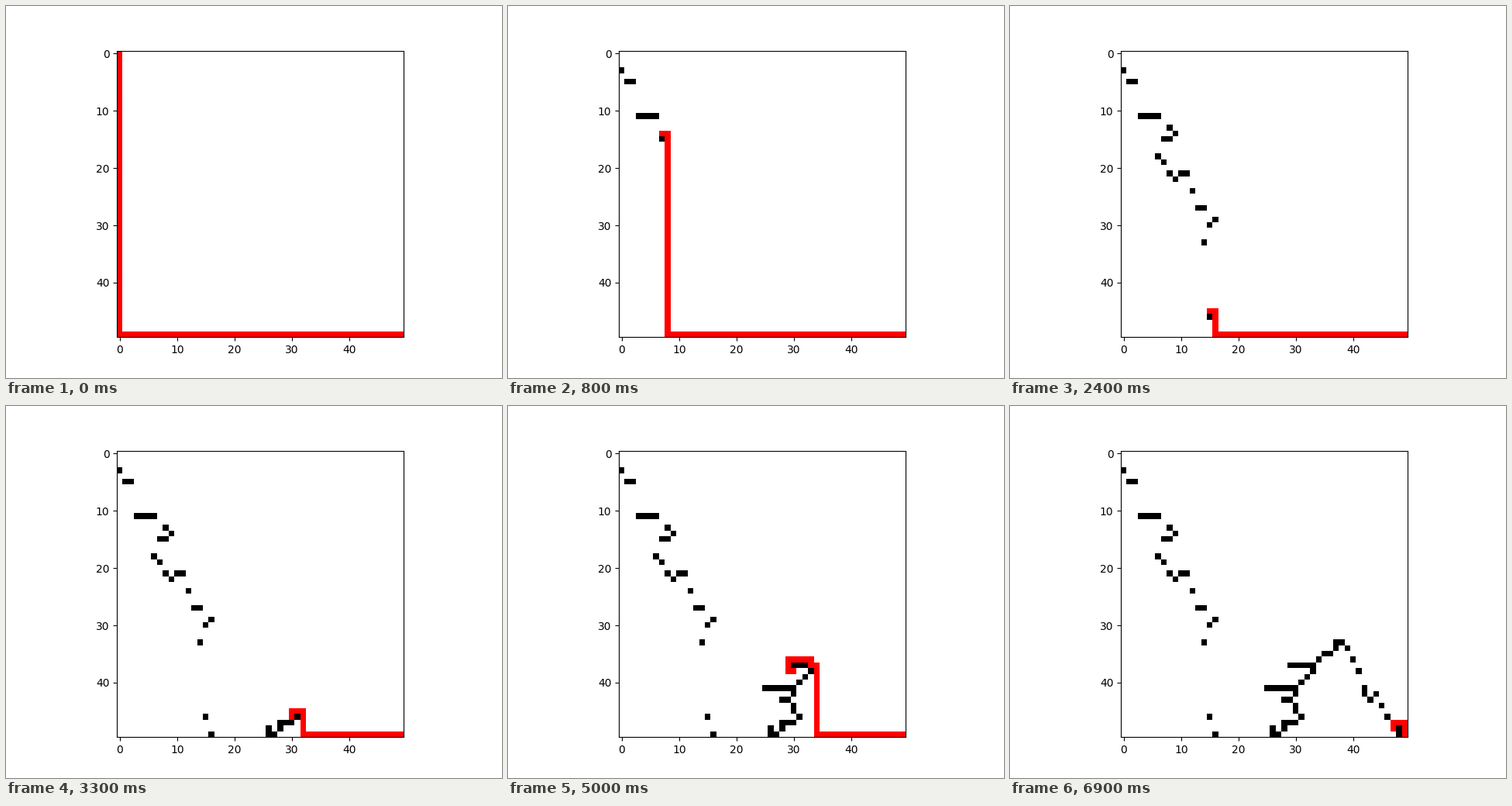
Animation, 640 px wide and 480 px high, one loop 7 s. Source, as a matplotlib script:

```python
import numpy as np
import matplotlib.pyplot as plt
from matplotlib.animation import FuncAnimation

SIZE = 50
GOAL = (SIZE - 1, SIZE - 1)
STEPS = [(1, 0), (0, 1), (0, -1), (-1, 0)]  # down, right, left, up
WHITE, BLACK, RED = (255, 255, 255), (0, 0, 0), (255, 0, 0)
SOLID = 5  # depth of thick ground
SHELF = 5  # length of a level shelf


def wall(*corners, depth=1):
    """Cells along a line through (column, row) corners, filled downwards."""
    xs, ys = zip(*corners)
    cols = range(xs[0], xs[-1] + 1)
    tops = np.floor(np.interp(cols, xs, ys) + 0.5).astype(int)
    return {(int(top) + d, col)
            for col, top in zip(cols, tops) for d in range(depth)}


def shelf(col, row):
    return wall((col, row), (col + SHELF - 1, row))


# Walls the robot cannot see until it bumps into them
hidden = set().union(
    # cliff on the left
    wall((0, 3), (1, 5), (2, 5), (3, 11), (6, 11), (7, 15), (9, 14)),
    wall((8, 13)),
    wall((6, 18), (9, 22), (11, 20.9), (13, 27), (14, 27), (15, 30), (16, 29)),
    wall((14, 33), (15, 46), (16, 49)),
    # floor, shelves and hill on the right
    wall((26, 48), (27, 49), (28, 47.4), (31, 46.3), depth=SOLID),
    shelf(28, 43), shelf(25, 41), shelf(29, 37),
    wall((30, 41), (35, 35), (36, 35), (37, 33), (39, 33.8),
         (43, 43), (44, 42), (46, 46), depth=SOLID),
    wall((48, 48), depth=SOLID),
)


def neighbours(cell):
    for dr, dc in STEPS:
        r, c = cell[0] + dr, cell[1] + dc
        if 0 <= r < SIZE and 0 <= c < SIZE:
            yield r, c


def distances(known):
    """Breadth-first distance of every free cell to the goal."""
    dist = {GOAL: 0}
    queue = [GOAL]
    for cell in queue:
        for nxt in neighbours(cell):
            if nxt not in known and nxt not in dist:
                dist[nxt] = dist[cell] + 1
                queue.append(nxt)
    return dist


def plan(start, known):
    dist = distances(known)
    path = [start]
    while path[-1] != GOAL:
        here = path[-1]
        path.append(next(n for n in neighbours(here)
                         if dist.get(n) == dist[here] - 1))
    return path


def paint(path, known):
    grid = np.full((SIZE, SIZE, 3), WHITE, dtype=np.uint8)
    for cell in known:
        grid[cell] = BLACK
    for cell in path:
        grid[cell] = RED
    return grid


def explore():
    """One picture per plan; the robot replans at each wall it bumps into."""
    robot, known, grids = (0, 0), set(), []
    while robot != GOAL:
        path = plan(robot, known)
        grids.append(paint(path, known))
        for cell in path[1:]:
            if cell in hidden:
                known.add(cell)
                break
            robot = cell
    return grids


grids = explore()

fig, ax = plt.subplots(figsize=(6.4, 4.8), dpi=100)
image = ax.imshow(grids[0])


def draw(i):
    image.set_data(grids[i])
    return [image]


anim = FuncAnimation(fig, draw, frames=len(grids), interval=100,
                     init_func=lambda: draw(0), repeat=True)
plt.show()
```
